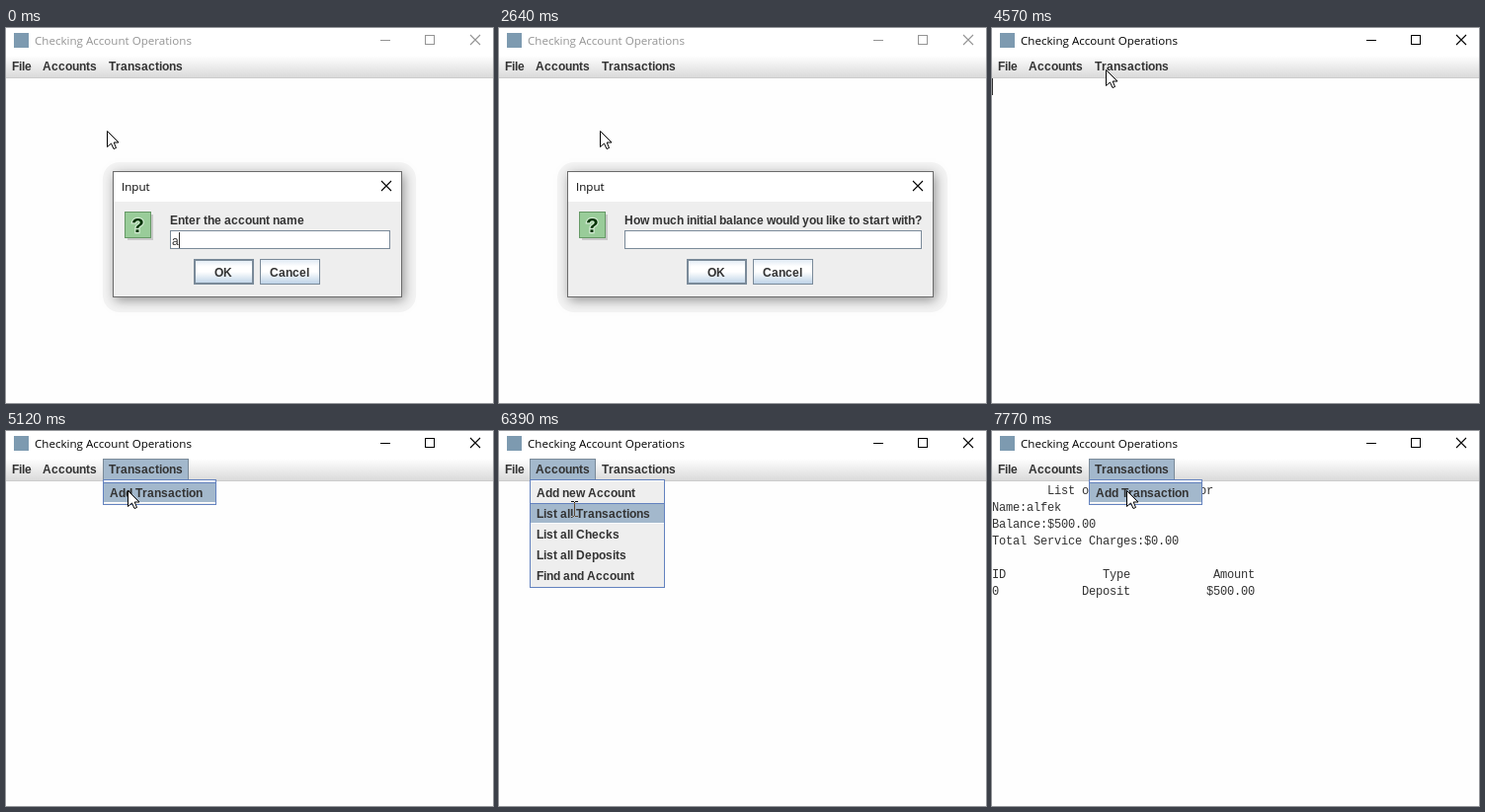
Animation of 493x380 px, one loop 8 s. Source, as an HTML page with a canvas:

```html
<!DOCTYPE html>
<html lang="en">
<head>
<meta charset="utf-8">
<title>Checking Account Operations</title>
<style>
html, body { margin: 0; width: 100%; height: 100%; overflow: hidden; background: #fefefe; }
canvas { display: block; }
</style>
</head>
<body>
<canvas id="stage" width="493" height="380"></canvas>
<script>
const W = 493, H = 380, LOOP = 8000;
const stage = document.getElementById('stage').getContext('2d');
const layer = document.createElement('canvas');
layer.width = W;
layer.height = H;
const sheet = layer.getContext('2d');
let g = stage;

const UI = '11.6px "Open Sans", sans-serif';
const BOLD = 'bold 12px "Liberation Sans", Arial, sans-serif';
const PLAIN = '12px "Liberation Sans", Arial, sans-serif';
const MONO = '12px "Liberation Mono", "Courier New", monospace';
const INK = '#333', EDGE = '#7a8a99', BLUE = '#6382bf', PICK = '#a3b8cc', PANEL = '#eee';

const NAME = 'alfek';
const REPORT = [
  '        List of Transactions for',
  'Name:' + NAME,
  'Balance:$500.00',
  'Total Service Charges:$0.00',
  '',
  'ID              Type            Amount',
  '0            Deposit           $500.00'
];
const MENUS = {
  accounts: { x: 31, w: 67, pw: 137, items: ['Add new Account', 'List all Transactions',
    'List all Checks', 'List all Deposits', 'Find and Account'] },
  transactions: { x: 98, w: 87, pw: 115, items: ['Add Transaction'] }
};

// Each track is a list of [start time, value...]; a value holds until the next one.
const MOUSE = [
  [0, 'arrow', 102, 104], [3370, 'beam', 104, 105], [4450, 'beam', 102, 82],
  [4570, 'arrow', 115, 42], [4720, 'arrow', 117, 34], [4970, 'arrow', 119, 37],
  [5120, 'arrow', 123, 60], [5550, 'arrow', 98, 48], [5700, 'arrow', 88, 36],
  [5850, 'arrow', 84, 44], [5970, 'arrow', 80, 54], [6120, 'arrow', 77, 66],
  [6240, 'arrow', 74, 78], [6390, 'beam', 76, 79], [6690, 'beam', 90, 73],
  [6810, 'beam', 107, 66], [6930, 'beam', 120, 60], [7080, 'arrow', 123, 40],
  [7230, 'arrow', 124, 38], [7500, 'arrow', 127, 42], [7620, 'arrow', 131, 48],
  [7770, 'arrow', 136, 60]
];
const MENU = [
  [0, '', -1], [4720, 'transactions', -1], [5120, 'transactions', 0], [5550, 'transactions', -1],
  [5700, 'accounts', -1], [5970, 'accounts', 0], [6240, 'accounts', 1], [6540, '', -1],
  [7380, 'transactions', -1], [7770, 'transactions', 0]
];
// dialog number, scale, opacity
const DIALOG = [
  [0, 1, 1, 1], [1230, 2, .984, .65], [1350, 2, .995, .9], [1470, 2, 1, 1],
  [3250, 2, .98, .4], [3370, 0, 1, 0]
];
// typed length, field caret
const TYPED = [
  [0, 1, 1], [370, 2, 1], [800, 3, 1], [920, 5, 1], [1230, 0, 1], [1750, 0, 0],
  [2120, 0, 1], [2640, 0, 0], [2760, 1, 1], [2880, 2, 1], [3000, 3, 1]
];
const CARET = [[0, 0], [3370, 1], [3800, 0], [4300, 1], [4720, 0], [6540, 1], [6930, 0]];

function at(track, t) {
  let found = track[0];
  for (const key of track) if (key[0] <= t) found = key;
  return found.slice(1);
}

function box(x, y, w, h, fill) {
  g.fillStyle = fill;
  g.fillRect(x, y, w, h);
}

function frame(x, y, w, h, color) {
  g.strokeStyle = color;
  g.lineWidth = 1;
  g.strokeRect(x + .5, y + .5, w - 1, h - 1);
}

function caption(s, x, y, color) {
  g.font = UI;
  g.fillStyle = color;
  g.textAlign = 'left';
  g.fillText(s, x, y);
}

// Swing text: every glyph advances by whole pixels. Returns the end of the line.
function text(s, x, y, font) {
  g.font = font;
  g.fillStyle = INK;
  g.textAlign = 'left';
  for (const c of s) {
    g.fillText(c, x, y);
    x += Math.round(g.measureText(c).width);
  }
  return x;
}

function gradient(y, h, ...stops) {
  const fill = g.createLinearGradient(0, y, 0, y + h);
  for (const [p, color] of stops) fill.addColorStop(p, color);
  return fill;
}

function cross(x, y, size, color) {
  g.strokeStyle = color;
  g.lineWidth = 1.1;
  g.beginPath();
  g.moveTo(x, y);
  g.lineTo(x + size, y + size);
  g.moveTo(x + size, y);
  g.lineTo(x, y + size);
  g.stroke();
}

function drawWindow(active) {
  const color = active ? '#000' : '#949494';
  box(0, 0, W, H, '#fefefe');
  box(0, 0, W, 28, '#fff');
  box(8, 5, 15, 15, '#7d9ab0');
  caption('Checking Account Operations', 29, 17, color);
  box(379, 12, 10, 1, color);
  frame(424, 7, 10, 10, color);
  cross(470, 7, 10, color);
  box(0, 28, W, 22, gradient(28, 22, [0, '#fff'], [1, '#dadada']));
  box(0, 50, W, 1, '#ccc');
}

function drawMenuBar(open) {
  const m = MENUS[open];
  if (m) {
    box(m.x, 28, m.w, 22, PICK);
    box(m.x, 28, m.w, 1, EDGE);
    box(m.x, 28, 1, 22, EDGE);
    box(m.x + m.w - 1, 29, 1, 21, EDGE);
  }
  text('File', 6, 43, BOLD);
  text('Accounts', 37, 43, BOLD);
  text('Transactions', 104, 43, BOLD);
}

function drawPopup(open, picked) {
  const m = MENUS[open];
  if (!m) return;
  const h = m.items.length * 21 + 5;
  box(m.x, 49, m.pw, h, PANEL);
  frame(m.x, 49, m.pw, h, BLUE);
  box(m.x + 1, 50, m.pw - 2, 1, '#fff');
  m.items.forEach((label, i) => {
    const y = 52 + i * 21;
    if (i === picked) {
      box(m.x + 1, y, m.pw - 2, 21, PICK);
      box(m.x + 1, y, m.pw - 2, 1, BLUE);
      box(m.x + 1, y + 20, m.pw - 2, 1, '#fff');
    }
    text(label, m.x + 7, y + 15, BOLD);
  });
}

function drawButton(x, label, inset, main) {
  box(x, 234, 61, 26, gradient(234, 26, [0, '#dde8f3'], [.3, '#fff'], [.5, '#fff'], [1, '#b8cfe5']));
  frame(x, 234, 61, 26, EDGE);
  if (main) frame(x + 1, 235, 59, 24, EDGE);
  text(label, x + inset, 252, BOLD);
}

function drawIcon(x, y) {
  box(x + 3, y + 3, 26, 26, '#c9c9c9');
  box(x, y, 27, 27, '#99cc99');
  frame(x, y, 27, 27, '#669966');
  g.font = 'bold 21px "Liberation Sans", Arial, sans-serif';
  g.textAlign = 'center';
  g.lineWidth = 2.5;
  g.strokeStyle = '#d3ead3';
  g.strokeText('?', x + 13.5, y + 21);
  g.fillStyle = '#003300';
  g.fillText('?', x + 13.5, y + 21);
}

function drawDialog(x, w, label, value, caret) {
  const y = 145, h = 128;
  g.fillStyle = '#f4f4f4';
  g.beginPath();
  g.roundRect(x - 10, y - 9, w + 24, h + 24, 17);
  g.fill();
  g.save();
  g.shadowColor = 'rgba(0,0,0,.4)';
  g.shadowBlur = 11;
  g.shadowOffsetX = 2;
  g.shadowOffsetY = 3;
  box(x, y, w, h, PANEL);
  g.restore();
  box(x, y, w, 31, '#fff');
  frame(x, y, w, h, '#6b6b6b');
  caption('Input', x + 9, 165, '#000');
  cross(x + w - 21, 155, 10, '#000');
  drawIcon(x + 12, 186);
  text(label, x + 58, 199, BOLD);
  box(x + 58, 205, w - 70, 19, '#fff');
  frame(x + 58, 205, w - 70, 19, EDGE);
  const end = text(value, x + 60, 220, PLAIN);
  if (caret) box(end, 207, 1, 16, INK);
  drawButton(190, 'OK', 21, true);
  drawButton(257, 'Cancel', 10, false);
}

function showDialog(t) {
  const [kind, scale, alpha] = at(DIALOG, t);
  if (!kind) return;
  const [count, caret] = at(TYPED, t);
  g = sheet;
  g.clearRect(0, 0, W, H);
  if (kind === 1) drawDialog(108, 293, 'Enter the account name', NAME.slice(0, count), caret);
  else drawDialog(69, 371, 'How much initial balance would you like to start with?', '500'.slice(0, count), caret);
  g = stage;
  g.save();
  g.globalAlpha = alpha;
  g.translate(254.5, 209);
  g.scale(scale, scale);
  g.drawImage(layer, -254.5, -209);
  g.restore();
}

// The text cursor inverts what lies under it.
function drawBeam(x, y) {
  g.save();
  g.globalCompositeOperation = 'difference';
  for (const end of [-8, 7]) {
    box(x - 3, y + end, 3, 1, '#fff');
    box(x + 1, y + end, 3, 1, '#fff');
  }
  box(x, y - 7, 1, 14, '#fff');
  g.restore();
}

function drawArrow(x, y) {
  const outline = [[0, 0], [0, 16], [4, 12.5], [6.5, 18], [9, 17], [6.7, 11.5], [11.5, 11.5]];
  g.beginPath();
  for (const [dx, dy] of outline) g.lineTo(x + dx + .5, y + dy + .5);
  g.closePath();
  g.fillStyle = '#fff';
  g.fill();
  g.strokeStyle = '#000';
  g.lineWidth = 1;
  g.stroke();
}

function draw(t) {
  const [open, picked] = at(MENU, t);
  const [pointer, x, y] = at(MOUSE, t);
  const listed = t >= 6540;
  drawWindow(t >= 3250);
  drawMenuBar(open);
  if (listed) REPORT.forEach((line, i) => text(line, 0, 64 + i * 17, MONO));
  if (at(CARET, t)[0]) box(0, listed ? 170 : 51, 1, 17, INK);
  drawPopup(open, picked);
  showDialog(t);
  if (pointer === 'beam') drawBeam(x, y);
  else drawArrow(x, y);
}

const start = performance.now();
function tick() {
  draw((performance.now() - start) % LOOP);
  requestAnimationFrame(tick);
}
tick();
</script>
</body>
</html>
```
